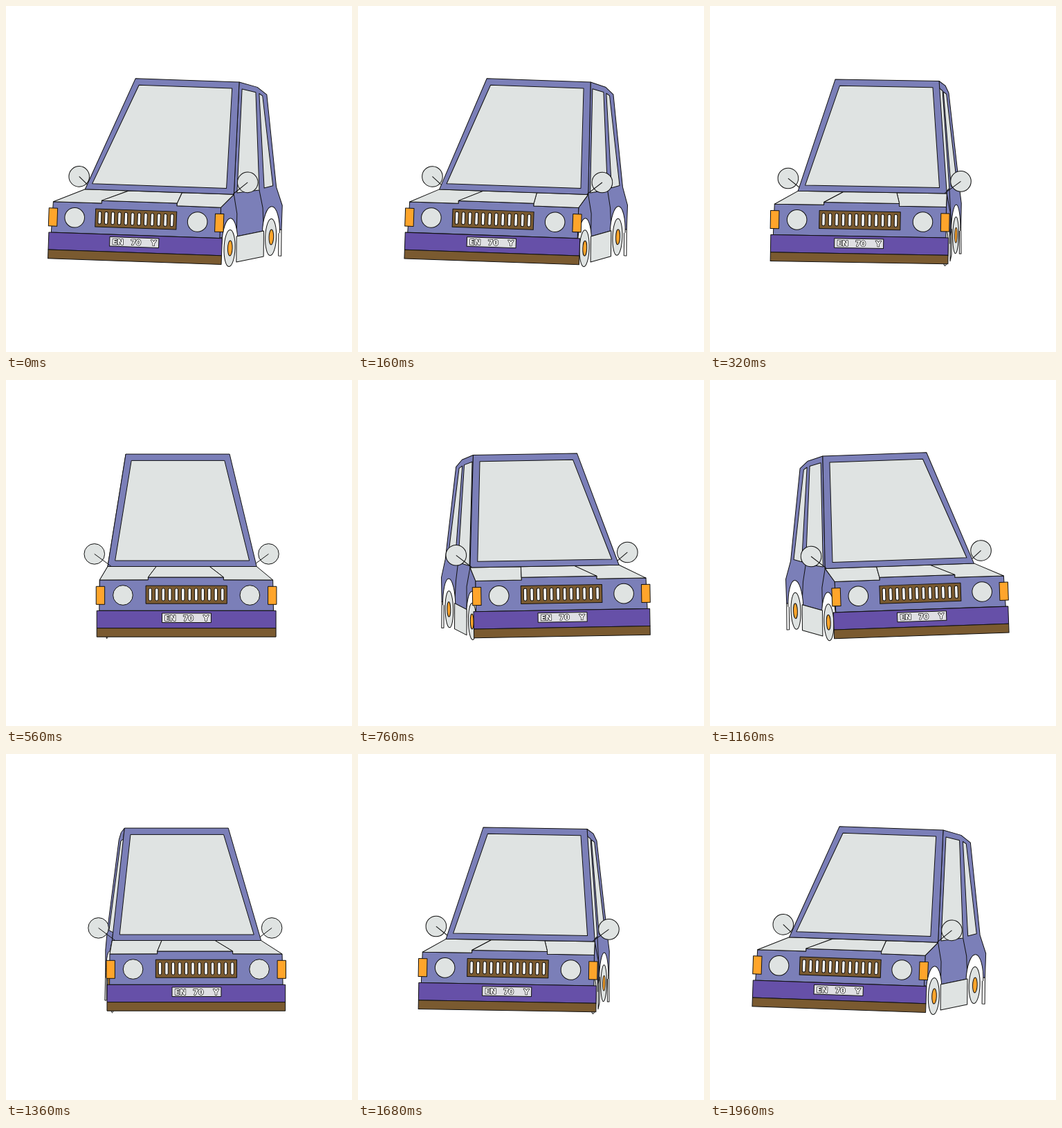
Animation, 500 px wide and 500 px high, one loop 2040 ms. Source, as an HTML page:

```html
<!DOCTYPE html>
<html lang="en">
<head>
<meta charset="utf-8">
<title>Swaying car</title>
<style>
html, body { margin: 0; width: 100%; height: 100%; overflow: hidden; background: #fff; }
svg { display: block; width: 100vw; height: 100vh; }
text { font: bold 11px "DejaVu Sans", "Liberation Sans", sans-serif; text-anchor: middle; paint-order: stroke; }
</style>
</head>
<body>
<svg viewBox="0 0 500 500"><g id="car" stroke="#111" stroke-width="1" stroke-linejoin="round"></g></svg>
<script>
const BODY = '#7b7fb8', GLASS = '#dfe3e2', BUMPER = '#6650a8', BROWN = '#7a5a30', LAMP = '#ffa52b';
const CX = 249.5, CY = 250, STEP = 40, LOOP = 2040, STEPS = 50;
const car = document.getElementById('car');

// A point is [half width, height, depth]; depth slides it sideways with the turn.
const ROOF = [75, 107.1, 7.6], SILL = [107.6, 269.5, -27];
const DOOR_TOP = [73, 262, 44], SKIRT_BACK = [72.5, 320.7, 53], SKIRT_FRONT = [113.5, 330, -27];
const TAIL = [[64, 113.5, 45], [59, 123.8, 64], [75, 257, 66.5], [72, 283, 79], [72, 318, 79]];
const HOOD_BACK = [38.5, 269.5, -33], HOOD_LIP = [54.5, 285, -55.5], HOOD_FOOT = [54.5, 288.8, -55.5];

function draw(turn) {
  const near = turn < 0 ? -1 : 1;
  const squeeze = 1 - 0.033 * turn * turn;
  const wide = (w, y, z) => [w * squeeze, y, z];
  const at = ([w, y, z], side) => [CX + side * w + z * turn, y];
  const list = pts => pts.map(p => p.map(n => n.toFixed(2)).join()).join(' ');
  const poly = (pts, fill) => `<polygon points="${list(pts)}" fill="${fill}"/>`;
  const line = pts => `<polyline points="${list(pts)}" fill="none"/>`;
  const oval = ([x, y], rx, ry, fill) => `<ellipse cx="${x}" cy="${y}" rx="${rx}" ry="${ry}" fill="${fill}"/>`;
  const onSide = (pts, side = near) => pts.map(p => at(p, side));
  const both = make => make(-1) + make(1);
  // Closed shape from one edge and its mirror image.
  const symmetric = (pts, fill) => poly([...onSide(pts, -1), ...onSide(pts, 1).reverse()], fill);

  const corner = wide(125.3, 289, -58.7);

  const mirror = side => {
    const c = at(wide(126, 251.4, -22), side);
    return oval(c, 14.8, 14.8, GLASS) + line([c, at([102, 269, -22.5], side)]);
  };

  const arch = (p, rx, ry) => {
    const [x, y] = at(p, near), r = rx * Math.abs(turn);
    return `<path d="M${x - r} ${y}A${r} ${ry} 0 0 1 ${x + r} ${y}" fill="#fff"/>`;
  };

  const wheel = p => {
    const c = at(p, near), r = Math.abs(turn);
    return oval(c, 8 * r, 26.5, GLASS) + oval([c[0] + near * 0.7 * r, c[1]], 3.3 * r, 11, LAMP);
  };

  const sideView = () =>
    poly(onSide([ROOF, ...TAIL, SKIRT_BACK, SKIRT_FRONT, wide(125, 333, -59), corner, SILL]), BODY) +
    poly(onSide([[69, 116.8, 18], [58, 121, 49], DOOR_TOP, [99, 267, -14]]), GLASS) +
    poly(onSide([[55, 122.5, 57], [59, 125.8, 58], [74, 255, 62.5], [70, 258.7, 54]]), GLASS) +
    line(onSide([SILL, [113, 297, -27], SKIRT_FRONT])) +
    line(onSide([DOOR_TOP, [70, 287.7, 53], SKIRT_BACK])) +
    poly(onSide([TAIL[4], [73, 356, 79], [72, 356, 76], [72, 318, 75]]), '#fff') +
    arch([73.5, 323, 62.5], 12.5, 38) + arch([110, 342, -33], 11.5, 38) +
    poly(onSide([SKIRT_FRONT, SKIRT_BACK, [72.5, 357.7, 54], [113.5, 367, -26]]), GLASS) +
    wheel([73.5, 329.3, 62.5]) + wheel([110, 347.4, -33]);

  const grille = () => {
    let s = `<g transform="translate(${CX - 59.7 * turn})">` +
      `<rect x="-58.6" y="297.2" width="117.2" height="26" fill="${BROWN}"/>`;
    for (let i = 0; i < 12; i++)
      s += `<rect x="${-54.6 + i * 9.5}" y="301" width="4.4" height="18" rx="2" fill="#fff"/>`;
    return s + '</g>';
  };

  const plate = () => {
    const word = (x, t) => `<text x="${x}" y="347.7" fill="#fff" stroke-width="1.3">${t}</text>`;
    return `<g transform="translate(${CX - 61 * turn})">` +
      `<rect x="-35.5" y="337" width="71" height="13.5" fill="#dfdfe3"/>` +
      word(-23.5, 'EN') + word(2.5, '70') + word(28, 'Y') + '</g>';
  };

  const lamps = side => {
    const [x] = at(wide(124.3, 0, -59.3), side);
    return oval(at(wide(91.8, 311, -59.5), side), 14.3, 14.3, GLASS) +
      `<rect x="${x - 6.2}" y="298.3" width="12.4" height="26" fill="${LAMP}"/>`;
  };

  const hood = () =>
    both(side => poly(onSide([SILL, HOOD_BACK, HOOD_LIP, HOOD_FOOT, corner], side), GLASS)) +
    symmetric([HOOD_BACK, HOOD_LIP], GLASS);

  const front = () => {
    const edge = y => wide(129.6, y, -59.5);
    return symmetric([HOOD_LIP, HOOD_FOOT, corner, wide(126, 333.3, -59.5)], BODY) + hood() +
      symmetric([edge(333.4), edge(358.6)], BUMPER) +
      symmetric([edge(358.6), edge(371.2)], BROWN) +
      grille() + both(lamps) + plate();
  };

  const cabin = () => symmetric([ROOF, SILL], BODY) + symmetric([[67.3, 116.4, 5.3], [97, 261, -27.5]], GLASS);

  car.setAttribute('transform', `rotate(${Math.trunc(2.3 * turn)} ${CX} ${CY})`);
  car.innerHTML = mirror(-near) + sideView() + front() + cabin() + mirror(near);
}

const start = performance.now();
let shown = -1;
function tick() {
  const t = (performance.now() - start) % LOOP;
  const step = Math.min(STEPS - 1, Math.floor(t / STEP));
  if (step !== shown) draw(Math.cos(2 * Math.PI * step / STEPS));
  shown = step;
  requestAnimationFrame(tick);
}
tick();
</script>
</body>
</html>
```
